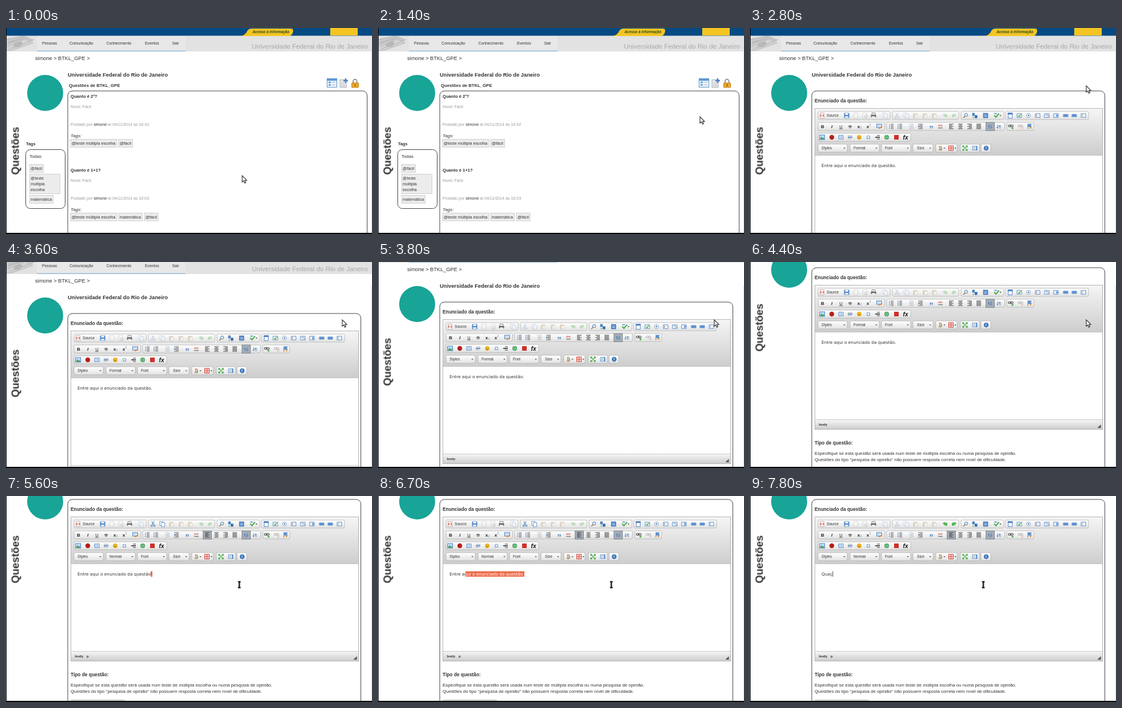
An HTML page for the animation above (8000 ms loop, 640 px wide and 360 px high).

```html
<!DOCTYPE html>
<html lang="pt">
<head>
<meta charset="utf-8">
<title>Questões</title>
<style>
html, body { margin: 0; width: 100%; height: 100%; overflow: hidden; background: #fff; }
svg { display: block; width: 640px; height: 360px; }
text { font-family: "Liberation Sans", Arial, sans-serif; fill: #333; white-space: pre; }
.b { font-weight: bold; }
.i { font-style: italic; }
.gray { fill: #999; }
.chip { fill: #ececec; stroke: #c6c6c6; stroke-width: .8; }
.box { fill: #fff; stroke: #444; }
.entry { font-family: "DejaVu Sans", sans-serif; font-size: 7.34px; }
.off { opacity: .33; }

.anim { animation: 8s step-end infinite; }
.list { animation-name: list; }
.form { animation-name: form; }
.idle { animation-name: idle; }
.focus { animation-name: focus; }
.old { animation-name: old; }
.fresh { animation-name: fresh; }
.cut { animation-name: cut; }
.sel { animation-name: cut, select; animation-duration: 8s, 8s; }
.typed { animation-name: type; }
.caret { animation-name: caret; }
.scroll { animation-name: scroll; }
.mouse { animation-name: mouse; }
.arrow { animation-name: arrow; }
.beam { animation-name: beam; }

@keyframes list { 0% { opacity: 1 } 34.94%, 100% { opacity: 0 } }
@keyframes form { 0% { opacity: 0 } 34.94%, 100% { opacity: 1 } }
@keyframes idle { 0% { opacity: 1 } 66.19%, 100% { opacity: 0 } }
@keyframes focus { 0% { opacity: 0 } 66.19%, 100% { opacity: 1 } }
@keyframes old { 0% { opacity: 1 } 88.69%, 100% { opacity: 0 } }
@keyframes fresh { 0% { opacity: 0 } 88.69%, 100% { opacity: 1 } }
@keyframes cut { 0% { opacity: 0 } 68.69% { opacity: 1 } 88.69%, 100% { opacity: 0 } }
@keyframes select {
  0% { clip-path: inset(0 0 0 98.2%) }
  74.94% { clip-path: inset(0 0 0 98.2%); animation-timing-function: steps(9, end) }
  86.19%, 100% { clip-path: inset(0 0 0 0) }
}
@keyframes type {
  0% { clip-path: inset(0 100% 0 0) }
  89.94% { clip-path: inset(0 69.5% 0 0) }
  92.44% { clip-path: inset(0 45% 0 0) }
  96.19% { clip-path: inset(0 21.3% 0 0) }
  97.44%, 100% { clip-path: inset(0 0 0 0) }
}
@keyframes caret {
  0% { opacity: 0; transform: translateX(131px) }
  66.19% { opacity: 1; transform: translateX(131px) }
  68.69% { opacity: 0; transform: none }
  88.69% { opacity: 1; transform: none }
  89.94% { opacity: 1; transform: translateX(5.8px) }
  92.44% { opacity: 1; transform: translateX(10.4px) }
  96.19% { opacity: 1; transform: translateX(15px) }
  97.44%, 100% { opacity: 1; transform: translateX(19.3px) }
}
@keyframes scroll {
  0% { transform: none }
  42.44% { transform: translateY(0); animation-timing-function: steps(10, end) }
  54.94% { transform: translateY(-100px) }
  56.19%, 100% { transform: translateY(-104px) }
}
@keyframes mouse {
  0% { transform: translate(413px, 258px) }
  11.19% { transform: translate(413px, 258px); animation-timing-function: steps(5, end) }
  17.44% { transform: translate(563px, 155px); animation-timing-function: steps(3, end) }
  21.19% { transform: translate(596px, 104px); animation-timing-function: steps(5, end) }
  27.44% { transform: translate(588px, 101px) }
  56.19% { transform: translate(588px, 101px); animation-timing-function: steps(7, end) }
  64.94%, 100% { transform: translate(408px, 155px) }
}
@keyframes arrow { 0% { opacity: 1 } 59.94%, 100% { opacity: 0 } }
@keyframes beam { 0% { opacity: 0 } 59.94%, 100% { opacity: 1 } }
</style>
</head>
<body>
<svg viewBox="0 0 640 360">
  <defs>
    <linearGradient id="bar" x2="0" y2="1"><stop stop-color="#f5f5f5"/><stop offset="1" stop-color="#cdcdcd"/></linearGradient>
    <linearGradient id="btn" x2="0" y2="1"><stop stop-color="#fff"/><stop offset="1" stop-color="#e2e2e2"/></linearGradient>
  </defs>
  <rect width="640" height="360" fill="#fff"/>

  <g class="anim scroll">
    <!-- header -->
    <rect y="13" width="640" height="28" fill="#e2e2e2"/>
    <rect width="640" height="13.5" fill="#064a83"/>
    <path d="M411 14Q419 12 422 5Q424 1 430 1H498Q503 1 502 6Q501 12 496 14Z" fill="#f4c522"/>
    <text class="b i" x="431" y="9.3" font-size="6.4" style="fill:#2b4a1c">Acesso à informação</text>
    <rect x="567" y="-35" width="48" height="48" fill="#f4c522"/>
    <g fill="#c9c9c9" stroke="#a9a9a9" stroke-width=".8">
      <path d="M0 20L31 14L48 21L14 33L0 30Z"/>
      <path d="M0 29L34 19L47 26L10 39H0Z" fill="#d3d3d3"/>
      <path d="M4 25L32 17M7 36L41 24M0 33L28 23" fill="none"/>
      <ellipse cx="21" cy="29" rx="7" ry="3.5" transform="rotate(-18 21 29)" fill="#b9b9b9"/>
    </g>
    <rect x="54" y="14" width="260" height="26" fill="#e8e8e8"/>
    <rect x="54" y="39.6" width="260" height="1.2" fill="#7fb2d6"/>
    <g font-size="6.8">
      <text x="63" y="29.4">Pessoas</text><text x="111" y="29.4">Comunicação</text>
      <text x="175.5" y="29.4">Conhecimento</text><text x="243" y="29.4">Eventos</text><text x="290.5" y="29.4">Sair</text>
    </g>
    <text x="430" y="36" font-size="11.52" style="fill:#a8a8a8">Universidade Federal do Rio de Janeiro</text>
    <text x="51" y="56.4" font-size="9.2">simone &gt; BTKL_GPE &gt;</text>
    <circle cx="68.5" cy="113.5" r="31.5" fill="#18a497"/>
    <text class="b" x="108" y="85.3" font-size="9.32">Universidade Federal do Rio de Janeiro</text>
    <text class="b" transform="translate(22.5 256.5) rotate(-90)" font-size="18.4">Questões</text>

    <!-- question list -->
    <g class="anim list">
      <text class="b" x="110" y="102.5" font-size="7.7">Questões de BTKL_GPE</text>
      <rect class="box" x="108" y="110" width="523.5" height="500" rx="8"/>
      <g stroke-width=".9">
        <rect x="561.5" y="88.5" width="17" height="15" fill="#eef5fc" stroke="#4a86c0"/>
        <path d="M562 90.5H578" stroke="#5b9bd8" stroke-width="3.4"/>
        <path d="M564 95H568M564 99.5H568" stroke="#5b9bd8" stroke-width="2.4"/>
        <path d="M570 95H576M570 99.5H576" stroke="#9ab"/>
        <rect x="584" y="90.5" width="11" height="13.5" fill="#e6e8ec" stroke="#a2a7ae"/>
        <path d="M586 96H592M586 99H593M586 101.5H593" stroke="#b9bec6"/>
        <path d="M594 88V96M590 92H598" stroke="#4f83c4" stroke-width="2.6"/>
        <path d="M607 97V93.5A3.3 3.8 0 0 1 613.6 93.5V97" fill="none" stroke="#8d8d8d" stroke-width="1.8"/>
        <rect x="604.5" y="96" width="12" height="8" rx="1" fill="#eda92d" stroke="#b57712"/>
        <path d="M610.5 98.5V101.5" stroke="#6b4508" stroke-width="1.6"/>
      </g>
      <text class="b" x="35" y="205" font-size="7.4">Tags</text>
      <rect class="box" x="34.5" y="212.5" width="69" height="103" rx="8"/>
      <text x="41" y="227" font-size="7.9">Todas</text>
      <g id="questions" font-size="7.2"></g>
    </g>

    <!-- question form -->
    <g class="anim form">
      <rect class="box" x="108" y="110" width="512.5" height="600" rx="8"/>
      <text class="b" x="113" y="130" font-size="8.35">Enunciado da questão:</text>
      <rect x="113.5" y="140.5" width="503" height="252" fill="#fff" stroke="#b6b6b6"/>
      <rect x="114" y="141" width="502" height="81.5" fill="url(#bar)"/>
      <path d="M114 222.5H616M114 375.5H616" stroke="#bcbcbc" stroke-width=".8"/>
      <rect x="114" y="376" width="502" height="16" fill="url(#bar)"/>
      <path d="M613.5 384V390H607.5Z" fill="#555"/>
      <g id="toolbar" font-size="6.6"></g>

      <text class="entry anim old" x="125" y="243">Entre aqui o enunciado da questão.</text>
      <g class="anim sel">
        <rect x="125" y="235.5" width="131" height="9.5" fill="#ef6c4a"/>
        <text class="entry" x="125" y="243" style="fill:#fff">Entre aqui o enunciado da questão.</text>
      </g>
      <text class="entry anim typed" x="125" y="243">Quaç</text>
      <rect class="anim caret" x="125" y="235.5" width=".8" height="9.5" fill="#222"/>

      <text class="b" x="120.5" y="386" font-size="6.1">body</text>
      <text class="b anim focus" x="141" y="386" font-size="6.1">p</text>
      <text class="b" x="113" y="419" font-size="8.35">Tipo de questão:</text>
      <g font-size="7.87">
        <text x="113" y="436.8">Especifique se esta questão será usada num teste de múltipla escolha ou numa pesquisa de opinião.</text>
        <text x="113" y="447.8">Questões do tipo "pesquisa de opinião" não possuem resposta correta nem nível de dificuldade.</text>
      </g>
      <rect x="113.5" y="460.5" width="94" height="14" rx="1.5" fill="#f6f6f6" stroke="#aaa"/>
    </g>
  </g>

  <g class="anim mouse">
    <path class="anim arrow" d="M0 0V11.3L2.6 8.9L4.3 12.9L6.3 12L4.6 8.2H8Z" fill="#fff" stroke="#222" stroke-width="1.1"/>
    <g class="anim beam" fill="none">
      <path d="M-2.2 -5H2.2M0 -5V5M-2.2 5H2.2" stroke="#999" stroke-width="3.4"/>
      <path d="M-2.2 -5H2.2M0 -5V5M-2.2 5H2.2" stroke="#222" stroke-width="1.8"/>
    </g>
  </g>
  <path d="M639.5 41V358" stroke="#dedede"/>
  <path d="M.5 0V360M0 359H640" stroke="#000"/>
  <rect y="358" width="640" height="2"/>
</svg>
<script>
const $ = id => document.getElementById(id);
const rect = (x, y, w, h, attrs) => `<rect x="${x}" y="${y}" width="${w}" height="${h}" ${attrs}/>`;
const line = (d, color, w = 1) => `<path d="${d}" fill="none" stroke="${color}" stroke-width="${w}"/>`;
const label = (x, y, s, attrs = '') => `<text x="${x}" y="${y}" ${attrs}>${s}</text>`;
const chip = (x, y, w, lines) =>
  rect(x, y, w, 3.5 + lines.length * 10.2, 'class="chip"') +
  lines.map((s, i) => label(x + 1.8, y + 9.6 + i * 10.2, s)).join('');

// Question list
const MULTI = '@teste múltipla escolha';
const question = (y, title, hour, chips) =>
  label(113, y + 2.6, title, 'class="b" font-size="7.6"') +
  label(113, y + 20.8, 'Nível: Fácil', 'class="gray" font-size="7.25"') +
  label(113, y + 51.6, `Postado por <tspan fill="#333" style="fill:#333">simone</tspan> at 04/11/2014 às ${hour}`,
    'class="gray" font-size="7.1"') +
  label(113, y + 71.8, 'Tags:', 'class="i" font-size="8"') +
  chips.map(([x, w, s]) => chip(x, y + 75, w, [s])).join('');

$('questions').innerHTML =
  question(119.5, 'Quanto é 2²?', '16:42', [[113, 81, MULTI], [197, 24.5, '@fácil']]) +
  question(248.3, 'Quanto é 1+1?', '16:03', [[113, 81, MULTI], [197, 41.5, 'matemática'], [242, 24, '@fácil']]) +
  chip(41.3, 238.5, 24, ['@fácil']) +
  chip(41.3, 255.3, 53, ['@teste', 'múltipla', 'escolha']) +
  chip(41.3, 292.5, 41, ['matemática']);

// Editor toolbar icons, each drawn around 0,0
const BLUE = '#4d84c4', DARK = '#444', GREEN = '#4cae4a', RED = '#d33c2f';
const sheet = (color = '#9aa3ad') => rect(-3.5, -4.5, 7, 9, `fill="#fff" stroke="${color}" stroke-width=".9"`);
const letter = (s, color = DARK, size = 8, attrs = '') =>
  `<text y="${size * .36}" text-anchor="middle" font-size="${size}" style="fill:${color}" ${attrs}>${s}</text>`;
const rows = (spans, color = DARK) =>
  line(spans.map(([a, b], i) => `M${a} ${i * 2 - 4}H${b}`).join(''), color, 1.1);
const field = (inner = '') => rect(-4, -3.2, 8, 6.4, `fill="#f4f9ff" stroke="${BLUE}" stroke-width=".9"`) + inner;
const disc = (color, r = 4.2) => `<circle r="${r}" fill="${color}"/>`;
const bold = 'class="b"';
const full = [-4, 4], right = [-1, 4];
const five = span => [full, span, full, span, full];
const list = color => rows([right, right, right, right, right].filter((_, i) => i % 2 < 2), '#777') + line('M-4 -3H-2.4M-4 0H-2.4M-4 3H-2.4', color, 1.6);
const indent = d => rows(five(right), '#666') + line(`M${-2 * d - 2} -2L${d - 2} 0L${-2 * d - 2} 2`, BLUE);
const dir = d => letter('¶', BLUE, 8, `x="${-2 * d}" class="b"`) + line(`M${2 * d} -3V3M${2 * d - 1.5} 1L${2 * d} 3.4L${2 * d + 1.5} 1`, BLUE);
const turn = d => `<path transform="scale(${d} 1)" d="M-4 -1L-.5 -4V-2.2H3.8V2.8H-.5V1H1.5V.4H-.5V2Z" fill="${GREEN}"/>`;
const chain = '<ellipse cx="-1.8" cy="-1" rx="2.6" ry="1.7" fill="none" stroke="#555" stroke-width="1.1"/><ellipse cx="1.6" cy="-1" rx="2.6" ry="1.7" fill="none" stroke="#555" stroke-width="1.1"/>';

const icons = {
  source: sheet('#c9a9a3') + line('M-1 -1.8L-2.6 0L-1 1.8M1 -1.8L2.6 0L1 1.8', RED, 1.1),
  save: rect(-4.5, -4.5, 9, 9, `rx="1" fill="${BLUE}"`) + rect(-2.5, -4, 5, 3, 'fill="#fff"') + rect(-3, 1, 6, 3, 'fill="#dce9f7"'),
  sheet: sheet(),
  preview: sheet() + '<circle cx="1.5" cy="1.5" r="2.4" fill="#cfe4f8" stroke="#777"/>',
  print: rect(-4.5, -1.5, 9, 4.5, 'rx="1" fill="#666"') + rect(-2.8, -4.5, 5.6, 3.4, 'fill="#fff" stroke="#777" stroke-width=".8"') + rect(-2.8, 1.2, 5.6, 3, 'fill="#eee"'),
  cut: line('M-2 -4.5L2 2M2 -4.5L-2 2', '#5d8fc9', 1.2) + `<g fill="none" stroke="${BLUE}"><circle cx="-2.4" cy="3" r="1.4"/><circle cx="2.4" cy="3" r="1.4"/></g>`,
  copy: `<g transform="translate(-1.3 -1) scale(.8)">${sheet(BLUE)}</g><g transform="translate(1.6 1.2) scale(.8)">${sheet(BLUE)}</g>`,
  paste: rect(-4, -4, 7.5, 8.5, 'rx="1" fill="#c69a5c"') + rect(-1, -1.5, 5, 6, 'fill="#fff" stroke="#999" stroke-width=".7"'),
  undo: turn(1), redo: turn(-1),
  find: '<circle cx="1" cy="-1" r="2.8" fill="#d6e9fb" stroke="#5a86b8"/>' + line('M-1 1L-4 4', '#a77b46', 1.7),
  replace: rect(-4.5, -4.5, 4.5, 5, `fill="${BLUE}"`) + rect(0, -.5, 4.5, 5, 'fill="#2f6bb0"') + line('M-3 2V4H-1', GREEN),
  all: rect(-4, -4, 8, 8, `fill="${BLUE}" stroke="#2f6bb0" stroke-dasharray="1.5 1"`) + line('M-2.5 -1H2.5M-2.5 1.5H2.5', '#d8e8f8'),
  spell: line('M-4 -.5L-1 3L4.5 -3.5', GREEN, 2) + line('M-4 -3.5H1', BLUE, 1.4),
  form: sheet(BLUE) + rect(-4.5, -4.5, 9, 2.6, `fill="${BLUE}"`),
  check: field(line('M-2 0L-.5 1.8L2.4 -2', GREEN, 1.4)),
  radio: `<circle r="3.6" fill="#fff" stroke="#8ea3ba"/>` + disc(BLUE, 1.4),
  field: field(line('M-2 -1.5V1.5', '#555')),
  area: field(line('M-2 -1H2M1 2.5L3.5 0', '#777')),
  drop: field(rect(0, -3, 4, 6, `fill="#9fc3ea"`) + line('M1 -.5L2 .8L3 -.5', DARK)),
  button: rect(-4.5, -2.5, 9, 5, 'rx="1" fill="#5d92d2"'),
  hidden: field(rect(-4, -3, 3, 6, 'fill="#b7c9de"')),
  bold: letter('B', '#222', 8, bold), italic: letter('I', '#222', 8, 'class="b i"'),
  under: letter('U', '#222', 7.5) + line('M-3 4.2H3', '#222', .8),
  strike: letter('S', '#222', 7.5) + line('M-3.2 0H3.2', '#222', .8),
  sub: letter('x', '#222', 8, bold) + letter('2', BLUE, 5, 'x="4" dy="2"'),
  sup: letter('x', '#222', 8, bold) + letter('2', BLUE, 5, 'x="4" dy="-3"'),
  clean: rect(-4.5, -4, 9, 6, `fill="#cfe2f6" stroke="${BLUE}"`) + line('M-1 3.5L4.5 1', '#e58a3c', 2),
  num: list(BLUE), dots: list('#3a6ea8'),
  out: indent(-1), in: indent(1),
  quote: letter('”', BLUE, 15, 'class="b" dy="4"'),
  div: letter('DIV', RED, 4.4, 'class="b" dy="-2"') + line('M-4 2.6H4', '#777', 1.4),
  left: rows(five([-4, 1])), center: rows(five([-2.4, 2.4])), right: rows(five([-1, 4])), block: rows(five(full)),
  ltr: dir(1), rtl: dir(-1),
  link: chain + line('M1 3H5M3 1V5', GREEN, 1.3), unlink: chain + line('M1 1L5 4.5M5 1L1 4.5', RED),
  flag: line('M-3 -4.5V4.5', '#666') + '<path d="M-3 -4.5H4L2 -1.8L4 1H-3Z" fill="#5c90cf"/>' + rect(0, 1, 3, 3, 'fill="#e5a54a"'),
  image: rect(-4.5, -4, 9, 8, `fill="#bfdcf6" stroke="${BLUE}"`) + '<path d="M-4 3.5L-1 -1L1 1.5L2.5 0L4 3.5Z" fill="#4f9a48"/>',
  disc: disc('#b5211d'),
  table: field(line('M-4 -1H4M-4 1.2H4M-1.3 -3V3M1.3 -3V3', '#8fb3dc', .7)),
  rule: line('M-4 -2.5H4M-4 2.5H2', '#aaa') + line('M-4 0H4', BLUE, 1.8),
  smile: disc('#f2c02e') + line('M-2.2 1Q0 3.2 2.2 1M-1.5 -1.8V-.8M1.5 -1.8V-.8', '#7a5510'),
  omega: letter('Ω', BLUE, 9.5), 
  split: line('M-1 -3H4M-1 3H4', '#777', 1.3) + line('M-4 0H4', '#222', 1.6),
  globe: disc('#3d9c57') + line('M-4 0H4M0 -4Q-3.5 0 0 4Q3.5 0 0 -4', '#a6dcb4', .8),
  square: rect(-4, -4, 8, 8, 'fill="#cf3029"'),
  fx: letter('fx', '#111', 10, 'class="b i" font-family="Liberation Serif, serif"'),
  ink: letter('A', '#777', 7, 'x="-2"') + line('M-4 -3H1M-4 3.5H1', '#d38b3c', 1.3) + line('M1 -2V3', GREEN, 1.4),
  fill: rect(-4.5, -4, 8, 8, `fill="#fbd9d5" stroke="${RED}"`) + line('M-4 0H3M-.5 -4V4', RED, .9),
  max: line('M-4 -1.5V-4H-1.5M4 -1.5V-4H1.5M-4 1.5V4H-1.5M4 1.5V4H1.5M-3.5 -3.5L3.5 3.5M3.5 -3.5L-3.5 3.5', GREEN, 1.3),
  blocks: field(line('M-2.5 -1H1M-2.5 1H1', '#8aa') + line('M3 -4V4', BLUE, 1.6)),
  about: disc('#3c78bd') + letter('i', '#fff', 6.5, bold)
};
const icon = (x, y, name, cls = '') => `<g transform="translate(${x} ${y})"><g class="${cls}">${icons[name]}</g></g>`;
const group = (x1, x2, y) => rect(x1, y - 7, x2 - x1, 14, 'rx="2" fill="url(#btn)" stroke="#b3b3b3" stroke-width=".8"');
const pressed = (x, cls = '') => rect(x - 7.5, 165, 15, 14.5, `class="${cls}" fill="#a5acb5" stroke="#777f88" stroke-width=".8"`);
const arrow = (x, y) => `<path d="M${x - 1.6} ${y - .8}H${x + 1.6}L${x} ${y + 1.2}Z" fill="#444"/>`;

// "name:x" entries; a leading "-" marks a disabled button
const bars = [
  [153, [[119, 245], [249, 365], [369, 444], [447, 592]],
    'source:126 save:169 -sheet:185 -preview:201 print:216 -copy:236 -cut:257 -copy:273 -paste:289 -paste:306 -paste:322 -undo:341 -redo:357 find:377 replace:393 all:412 spell:431 form:455 check:471 radio:487 field:503 area:519 drop:535 button:552 button:567 hidden:583'],
  [172, [[119, 235], [239, 445], [449, 496]],
    'bold:127 italic:143 under:159 strike:175 sub:190 sup:206 clean:226 num:247 dots:262 -out:282 in:298 quote:317 div:333 left:352 center:368 right:384 block:400 ltr:420 rtl:435 link:456 -unlink:473 flag:489'],
  [191, [[119, 281]],
    'image:126 disc:143 table:159 rule:175 smile:191 omega:207 split:223 globe:239 square:256 fx:272'],
  [210, [[119, 170], [175, 226], [230, 281], [285, 320], [325, 362], [368, 401], [404, 421]],
    'ink:334 fill:352 max:376 blocks:393 about:413']
];
const under = y => y === 172 ? pressed(420) + pressed(352, 'anim focus') : '';
$('toolbar').innerHTML = bars.map(([y, groups, names]) =>
  groups.map(([a, b]) => group(a, b, y)).join('') + under(y) +
  names.split(' ').map(s => {
    const [name, x] = s.replace('-', '').split(':');
    return icon(x, y, name, s[0] === '-' ? 'off' : '');
  }).join('')).join('') +
  label(134, 155.4, 'Source') +
  label(125, 212.3, 'Styles') + label(181, 212.3, 'Format', 'class="anim idle"') +
  label(181, 212.3, 'Normal', 'class="anim focus"') +
  label(236, 212.3, 'Font') + label(292, 212.3, 'Size') +
  [165, 221, 276, 315, 340, 359].map(x => arrow(x, 210)).join('') + arrow(438, 153) +
  icon(257, 153, 'cut', 'anim cut') + icon(273, 153, 'copy', 'anim cut') +
  icon(341, 153, 'undo', 'anim fresh') + icon(357, 153, 'redo', 'anim fresh');
</script>
</body>
</html>
```
